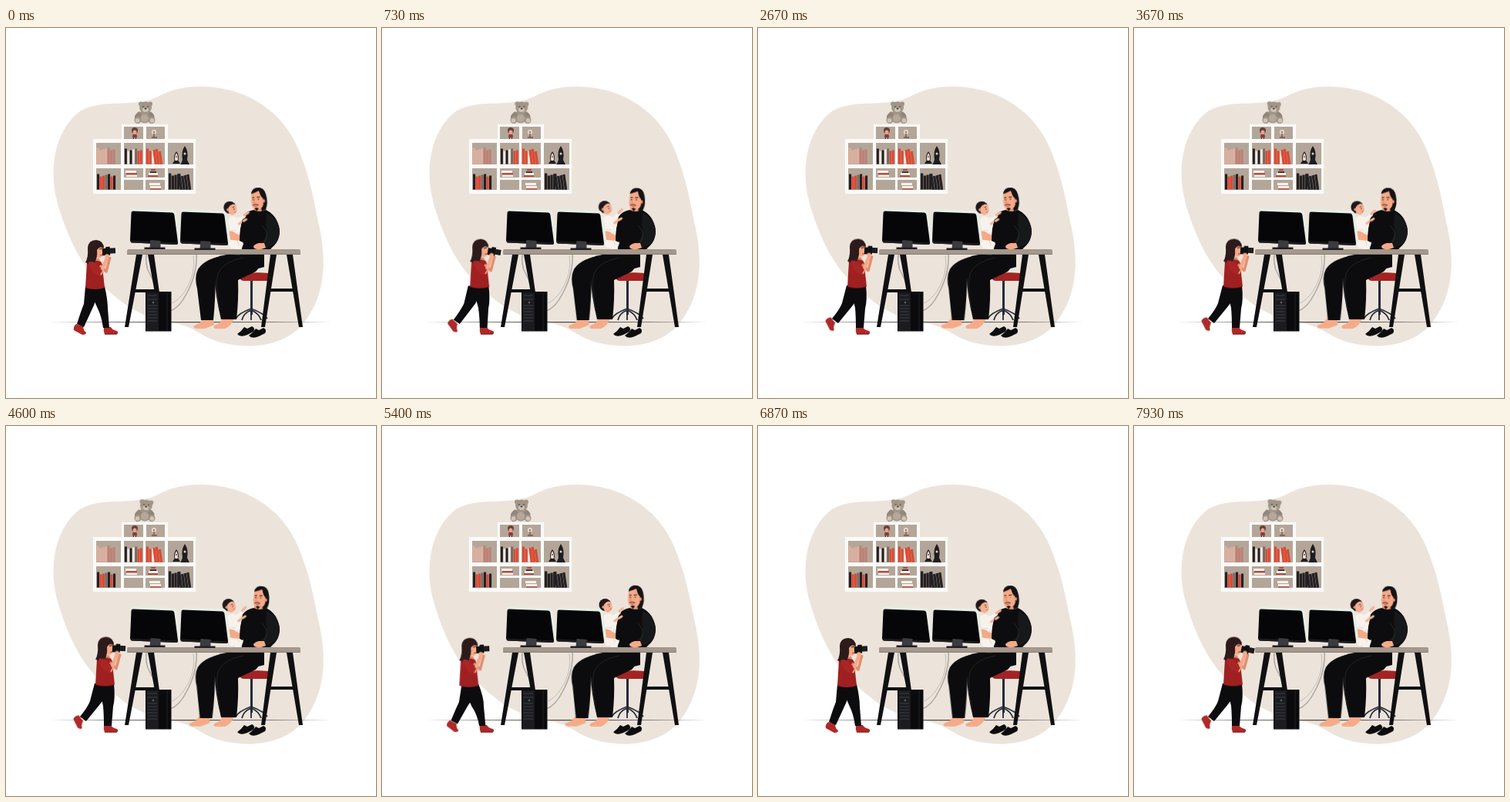
These frames come from a looping animation (480x480 px, 8000 ms). An HTML page:

```html
<!DOCTYPE html>
<html lang="en">
<head>
<meta charset="utf-8">
<title>Home office</title>
<style>
html, body { margin: 0; width: 100%; height: 100%; overflow: hidden; background: #fff; }
svg { display: block; width: 100vw; height: 100vh; }
.move { animation: 8s ease-in-out infinite; }

/* The girl steps forward, holds, steps back past her start and settles. */
#girl { animation-name: girl; }
@keyframes girl {
  0%, 1%, 79%, 87.5% { transform: none; }
  12%, 57%, 98.5%, 100% { transform: translate(13px, -1.5px); }
  71% { transform: translate(-5px, 0); }
}
#backLeg { animation-name: backLeg; }
@keyframes backLeg {
  0%, 1%, 79%, 87.5% { d: path("M103 335L119 335Q117 356 112 364L101 388L92 384Q97 368 101 358Z"); }
  6.5%, 64%, 93% { d: path("M109 335L125 335Q122 355 114 363L98 385L90 380Q99 367 104 358Z"); }
  12%, 57%, 98.5%, 100% { d: path("M115 334L132 334Q129 354 122 361L104 383L96 377Q106 365 109 357Z"); }
  71% { d: path("M98 335L114 335Q114 356 108 364L98 388L89 384Q92 368 96 358Z"); }
}
#frontLeg { animation-name: frontLeg; }
@keyframes frontLeg {
  0%, 1%, 79%, 87.5% { d: path("M106 335L128 335Q132 353 132 364L134 389L126 389Q124 374 119 364Z"); }
  12%, 57%, 98.5%, 100% { d: path("M119 334L140 334Q142 353 139 364L137 389L127 389Q127 374 126 363Z"); }
  71% { d: path("M101 335L123 335Q131 353 131 364L134 389L126 389Q123 374 115 364Z"); }
}
#backShoe { transform-origin: 96px 385px; animation-name: backShoe; }
@keyframes backShoe {
  0%, 1%, 79%, 87.5% { transform: none; }
  6.5%, 64%, 93% { transform: translate(-3px, -3px) rotate(18deg); }
  12%, 57%, 98.5%, 100% { transform: translate(2px, -6px) rotate(35deg); }
  71% { transform: translate(-3px, 0); }
}
#camera { transform-origin: 128px 291px; animation-name: camera; }
@keyframes camera {
  0%, 1%, 71%, 87.5% { transform: rotate(-3deg); }
  12%, 19%, 98.5%, 100% { transform: translate(1px, 1px) rotate(12deg); }
  32%, 57% { transform: rotate(3deg); }
}
#head { transform-origin: 331px 239px; animation-name: head; }
@keyframes head {
  0%, 33%, 86.5% { transform: rotate(-2deg); }
  12%, 19%, 55%, 60%, 98.5%, 100% { transform: translate(1px, 1px) rotate(5deg); }
  67.5% { transform: rotate(2deg); }
}
#eyes { transform-origin: 325px 222px; animation-name: blink; }
@keyframes blink {
  0%, 16%, 21%, 84%, 88%, 100% { transform: none; }
  17.5%, 19.5%, 85.5%, 86.5% { transform: scaleY(.25); }
}
#baby { transform-origin: 298px 280px; animation-name: baby; }
@keyframes baby {
  0%, 33%, 86.5% { transform: rotate(1deg); }
  12%, 19%, 57.5%, 98.5%, 100% { transform: translate(0, -1px) rotate(-1deg); }
  67.5% { transform: translate(0, -1px); }
}
#babyArm { transform-origin: 298px 249px; animation-name: babyArm; }
@keyframes babyArm {
  0%, 33%, 86.5% { transform: rotate(4deg); }
  12%, 19%, 57.5%, 98.5%, 100% { transform: rotate(-7deg); }
  67.5% { transform: rotate(-2deg); }
}
#shin { transform-origin: 260px 308px; animation-name: shin; }
@keyframes shin {
  0% { transform: none; }
  33%, 67.5% { transform: rotate(1.2deg); }
  86.5%, 100% { transform: rotate(.6deg); }
}
#foot { transform-origin: 262px 380px; animation-name: foot; }
@keyframes foot {
  0% { transform: translate(2px, 0); }
  18.4%, 86.5%, 100% { transform: none; }
  33%, 67.5% { transform: translate(-2px, 0); }
}
#teddyHead { transform-origin: 180px 110px; animation-name: teddy; }
@keyframes teddy {
  0%, 33%, 67.5% { transform: none; }
  18.4%, 86.5% { transform: rotate(4deg); }
  57.5%, 100% { transform: rotate(7deg); }
}
</style>
</head>
<body>
<svg viewBox="0 0 480 480">
  <path fill="#ece4db" d="M253 76C310 76 356 107 376 150C395 192 399 224 407 260C417 309 412 350 386 383C362 412 319 418 279 408C251 400 247 388 215 382C171 376 142 352 114 322C90 296 74 254 66 224C55 181 64 132 96 108C125 90 169 105 199 88C216 79 233 76 253 76Z"/>
  <path d="M56 381.500Q240 380.300 424 381.500Q240 383 56 381.500Z" fill="#4d4644"/>

  <g id="shelf">
    <path fill="#fbfaf8" d="M150 125H210V144H246V215H113V144H150Z"/>
    <path fill="#b3a699" d="M153 128H178V144H153ZM182 128H206V144H182ZM117 149H149V177H117ZM153 149H178V177H153ZM181 149H206V177H181ZM210 149H243V177H210ZM117 182H149V210H117ZM153 182H178V194H153ZM181 182H206V194H181ZM153 197H178V210H153ZM181 197H206V210H181ZM210 182H243V210H210Z"/>
    <g id="books"></g>
    <path d="M155 185h14v3h-14zM156 191h14v2h-14zM185 188h12v3h-12zM186 201h14v3h-14zM187 205h14v3h-14z" fill="#f8f1ea"/>
    <path d="M156 188h14v2h-14zM184 191h13v2h-13zM188 183h6v2h-6zM187 208h14v1.500h-14z" fill="#b94a40"/>
    <path d="M187 186h8v2h-8z" fill="#40302e"/>
    <path d="M221 160Q225 165 223.500 172L226 176H216L218.500 172Q217 165 221 160ZM232 153Q237 160 235 171L238 177H226.500L229 171Q227 160 232 153Z" fill="#1f1d20"/>
    <path d="M221 162Q224 167 222.500 172H219.500Q218 167 221 162Z" fill="#e9dfd6"/>
    <circle cx="221" cy="167" r="1" fill="#b73328"/><circle cx="232" cy="163" r="1.500" fill="#d8cec4"/>
    <circle cx="192" cy="135" r="3" fill="#eee4dc"/>
    <path d="M189 142h7M192 137v5" stroke="#76574c" stroke-width="1.300"/><circle cx="192" cy="135" r="1.500" fill="#b5796c"/>
    <circle cx="167" cy="133" r="4" fill="#6b3d34"/><circle cx="167" cy="135" r="2.500" fill="#e5a48c"/>
    <path d="M164.500 138h5l.5 4h-6z" fill="#8c3b35"/><path d="M165.500 142v2m3-2v2" stroke="#332521"/>
  </g>

  <g fill="#a19587">
    <ellipse cx="180" cy="115" rx="8.500" ry="8.500"/>
    <path d="M173 108Q166 112 167 118Q171 120 176 113ZM187 108Q194 112 192 118Q189 120 184 113Z" fill="#92867a"/>
    <circle cx="180" cy="117" r="5" fill="#b3a89b"/>
    <circle cx="171" cy="119.500" r="4.500"/><circle cx="189" cy="119.500" r="4.500"/>
    <g fill="#cfc4b8"><circle cx="170.500" cy="120" r="2.800"/><circle cx="189.500" cy="120" r="2.800"/></g>
    <g id="teddyHead" class="move">
      <circle cx="175" cy="98.500" r="3"/><circle cx="187" cy="98.500" r="3"/>
      <ellipse cx="181" cy="103" rx="8" ry="7.500"/>
      <ellipse cx="181" cy="106" rx="4" ry="3" fill="#cfc4b8"/>
      <g fill="#332d2a"><circle cx="178" cy="102" r=".8"/><circle cx="184" cy="102" r=".8"/><ellipse cx="181" cy="104.500" rx="1.500" ry="1"/></g>
    </g>
  </g>

  <g fill="none" stroke="#262a3a" stroke-width="1.800">
    <path d="M318.500 327V372" stroke-width="3"/>
    <path d="M298 377Q302 370 318 364Q334 370 339 377M306 379Q308 370 318 366Q328 370 331 379M318 364V379"/>
  </g>
  <path d="M304 320Q318 316 340 318Q343 323 339 328H308Q302 327 304 320ZM339 276Q345 278 344 290H336Z" fill="#a32323"/>

  <g id="shin" class="move">
    <path id="foot" class="move" d="M254 377L249 383L242 386Q240 389 244 390H256Q264 387 268 385L267 377Z" fill="#f5ab88"/>
    <path d="M290 294Q258 298 249 313Q244 323 248 338L253 379H269Q272 350 272 312Z" fill="#0c0c0e"/>
  </g>
  <path d="M289 293.500H335V310L272 326L260 306Q270 296 289 293.500Z" fill="#0c0c0e"/>
  <path d="M281 377L277 383L270 386Q268 389 272 390H284Q292 387 296 377Z" fill="#f5ab88"/>
  <path d="M335 293Q334 306 324 316L301 327Q302 352 299 378H279Q271 345 271 323Q276 300 311 293Z" fill="#0c0c0e"/>
  <path d="M308 298Q281 303 275 319Q271 333 277 365" fill="none" stroke="#29292c" stroke-width=".8"/>

  <g id="father">
    <path d="M324 227H336L339 241Q330 246 321 240Z" fill="#df8f70"/>
    <path d="M321 236Q330 240 337 236Q353 243 355 264Q355 281 337 290H307Q302 278 304 263L307 244Q312 238 321 236Z" fill="#0d0d0f"/>
    <g id="head" class="move">
      <path d="M319 214Q321 207 328 207Q336 207 338 216Q341 227 337 236L332 238L328 215Z" fill="#151315"/>
      <path d="M319 214Q324 208 331 212L336 222Q335 234 326 237Q319 235 318.500 226Z" fill="#f5a987"/>
      <path d="M319 215Q325 213 329 211Q331 219 334 221L334 229L338 222Q337 207 328 207Q320 207 319 215Z" fill="#151315"/>
      <ellipse cx="335" cy="224.500" rx="1.500" ry="2.200" fill="#e79777"/>
      <path d="M320 220L323 219.500M326 219.500L330 219" stroke="#211715"/>
      <g id="eyes" class="move" fill="#211715"><circle cx="321.500" cy="222.500" r=".8"/><circle cx="328" cy="222" r=".8"/></g>
      <path d="M323.500 221L321.500 226.500H324" fill="none" stroke="#cf7e61" stroke-width=".7"/>
      <path d="M320.500 229.500Q324 227.500 328 229.500" fill="none" stroke="#211715" stroke-width=".9"/>
      <path d="M322.500 234Q325 232 328 234L325.500 237.500Z" fill="#211715"/>
      <path d="M321.500 230.500Q325 233 327 230.500Z" fill="#c64a3c"/>
    </g>
  </g>

  <g id="baby" class="move">
    <path d="M287 249Q290 243 297 245Q304 248 304 258Q303 267 308 280L303 294H296L297 286H291Q286 274 290 264Z" fill="#f8f2ed"/>
    <path d="M301 265Q297 274 303 282M291 262L298 263" fill="none" stroke="#d9cec6" stroke-width=".7"/>
    <g transform="translate(-1.500 -2)">
      <circle cx="291" cy="235" r="8" fill="#211718"/>
      <path d="M290 234Q295 228 299 232L300.500 238Q299.500 244 294 245Q288 243 289 236Z" fill="#f3b093"/>
      <path d="M294 235L297 234" stroke="#493029" stroke-width=".8"/><circle cx="296.500" cy="237" r=".7" fill="#291f1d"/>
      <path d="M297 241L299 240" stroke="#b84b3e" stroke-width=".8"/><circle cx="288.500" cy="238" r="1.700" fill="#e99e82"/>
    </g>
    <g id="babyArm" class="move" fill="none" stroke-linecap="round">
      <path d="M298 249Q303 249 308 243" stroke="#f8f2ed" stroke-width="4.500"/>
      <path d="M308 242L313 238" stroke="#f3b093" stroke-width="3"/>
    </g>
    <path d="M302 254L311 248" stroke="#f3b093" stroke-width="3" stroke-linecap="round"/>
  </g>
  <path d="M288 264Q294 262 299 267L306 270L304 276L292 275Q286 271 288 264Z" fill="#f5a987"/>
  <path d="M307 250Q313 259 307 278L303 276Q303 259 307 250Z" fill="#0d0d0f"/>
  <path d="M338 240Q355 247 355 265Q352 284 333 286L329 279Q342 272 337 256Z" fill="#17181a"/>
  <path d="M332 256Q343 266 335 278" fill="none" stroke="#343438" stroke-width=".7"/>

  <g fill="none" stroke="#aaa49e" stroke-width="1.400">
    <path d="M183 288Q179 307 187 320Q194 331 192 344M247 290Q249 318 234 345Q225 363 213 367"/>
    <path d="M243 295Q247 320 231 343Q223 354 215 357" stroke="#c3beb8" stroke-width="1"/>
  </g>
  <path d="M169 294H177L159 388H154ZM184 294H192L199 343H193ZM164 339H197V343H163ZM343 294H351L336 388H331ZM364 294H372L385 388H380ZM338 338H378V342H337Z" fill="#101012"/>
  <path d="M181 342H214.500V393.500H181Z" fill="#0b0b0e"/>
  <path d="M182 343H198V393H182Z" fill="#1b1b20"/>
  <path d="M184 347H196M184 352H196M184 360H196M184 364H196M184 368H196M184 372H196M184 376H196M184 380H196" stroke="#41434a" stroke-width=".9"/>
  <path d="M209 343V393" stroke="#202127"/><circle cx="191" cy="356" r="1.200" fill="#65676f"/>
  <rect x="157" y="287" width="225" height="7" rx="2" fill="#a4978c"/>
  <path d="M157 293.500H382" stroke="#81776f" stroke-width=".8"/>
  <path d="M335 279L328 279Q321 281 321 284Q323 288 331 287L337 285Z" fill="#f5a987"/>

  <defs>
    <g id="monitor">
      <path d="M1 -2L57 0Q60 1 61 6L66 40L60 45L4 4Z" fill="#e6eee5"/>
      <path d="M4 1.500L55 3.500Q57.500 3.500 58 7L62.500 42Q63 45 60 45L2.500 42.500Q.5 42 .5 39L2 4Q2 1.500 4 1.500Z" fill="#060608"/>
      <path d="M1 39.500L62 42.500Q63 45 60 45L2.500 42.500Q1 42 1 39.500Z" fill="#1b1b1f"/>
      <path d="M27 39L40 40V49H26Z" fill="#3b3b40"/>
      <path d="M19 48.500H46V51H19Z" fill="#202024"/>
    </g>
  </defs>
  <use href="#monitor" x="160.500" y="236"/>
  <use href="#monitor" x="225.500" y="237"/>

  <g fill="#0d0d0f">
    <path id="slipper" d="M300 397Q305 394 309 388L313 390L319 387Q324 389 321 394L313 398Q304 402 300 397Z"/>
    <use href="#slipper" x="15" y="2"/>
  </g>

  <path id="backShoe" class="move" d="M91 384L100 387Q100 392 104 395Q104 398 99 398L88 392Q87 387 91 384Z" fill="#b02828"/>
  <path d="M127 388H136Q138 392 144 393Q147 396 143 397.500H128Q126 393 127 388Z" fill="#b02828"/>
  <path d="M128 397H144" stroke="#71201f"/>
  <path id="backLeg" class="move" fill="#0c0c0e" d="M103 335L119 335Q117 356 112 364L101 388L92 384Q97 368 101 358Z"/>
  <path id="frontLeg" class="move" fill="#0c0c0e" d="M106 335L128 335Q132 353 132 364L134 389L126 389Q124 374 119 364Z"/>
  <g id="girl" class="move">
    <path d="M112 299H121L123 306H110Z" fill="#df8f70"/>
    <path d="M105 304Q113 300 123 303Q127 309 126 319L128 337Q115 341 103 337L104 320Z" fill="#9f2021"/>
    <path d="M122 308L130 316L135 297" fill="none" stroke="#df8f70" stroke-width="3.500" stroke-linejoin="round"/>
    <path d="M114 278Q122 275 126 284L127 293Q124 300 117 298L111 288Z" fill="#f5a987"/>
    <path d="M106 285Q107 275 117 275Q127 276 127 286Q122 282 118 288Q119 298 115 304Q109 308 103 304Q107 298 106 285Z" fill="#2d1b1b"/>
    <path d="M121 287L125 286" stroke="#301d1d"/><path d="M122 295L125 294" stroke="#ae302a"/>
    <g id="camera" class="move">
      <path d="M125 286H129L130 284H135V286H142V293H135V295H125Z" fill="#111113"/>
      <path d="M136 286V293M139 286V293" stroke="#3b3b40" stroke-width=".8"/>
    </g>
    <path d="M113 309L123 318L131 298" fill="none" stroke="#f5a987" stroke-width="4.500" stroke-linejoin="round"/>
    <circle cx="131" cy="296" r="2.800" fill="#f5a987"/>
    <path d="M107 304Q112 301 117 306L125 315L121 322Q110 318 107 304Z" fill="#a92627"/>
  </g>
</svg>
<script>
const tones = { p: '#ddb0a0', w: '#f2e9e1', r: '#dc4a32', d: '#232023', g: '#746b66', b: '#bd8276' };
const group = document.getElementById('books');

// Stand a row of books on a shelf; the last `leaning` ones tip over.
function addBooks(x, floor, spec, width, height, leaning = 0) {
  [...spec].forEach((tone, i) => {
    const book = document.createElementNS('http://www.w3.org/2000/svg', 'rect');
    const tall = height - (i * 7 % 4);
    const left = x + i * width;
    const attrs = { x: left, y: floor - tall, width: width - .4, height: tall, fill: tones[tone] };
    if (i >= spec.length - leaning) attrs.transform = `rotate(-8 ${left + width} ${floor})`;
    for (const key in attrs) book.setAttribute(key, attrs[key]);
    group.append(book);
  });
}
addBooks(117.5, 176.500, 'ppppbbb', 3.5, 21);
addBooks(154, 176.500, 'dwdwgrr', 3.3, 20);
addBooks(182, 176.500, 'rrwrrr', 3.6, 20, 3);
addBooks(118, 209.500, 'drrgdrd', 3.5, 20);
addBooks(211, 209.500, 'dddddddd', 3.7, 21, 4);
</script>
</body>
</html>
```
